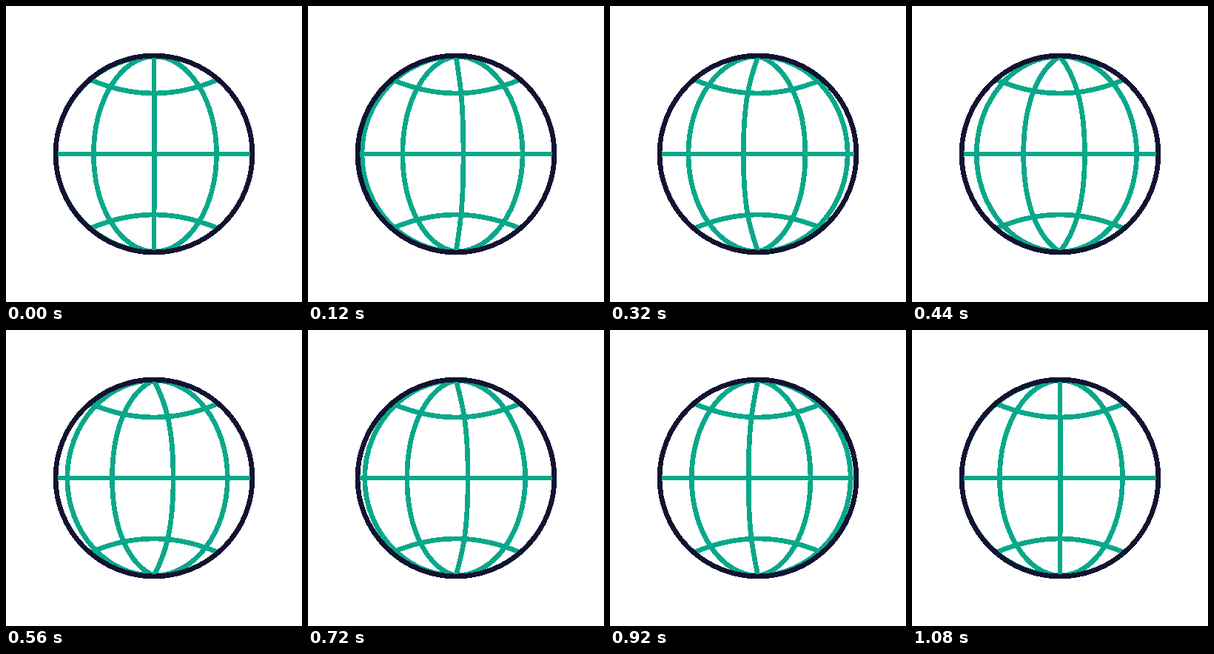
An HTML page for the animation above (3600 ms loop, 400 px wide and 400 px high).

```html
<!DOCTYPE html>
<html lang="en">
<head>
<meta charset="utf-8">
<title>Spinning globe</title>
<style>
  html, body { margin: 0; width: 100%; height: 100%; overflow: hidden; background: #fff; }
  svg { display: block; width: 100%; height: 100%; shape-rendering: crispEdges; }
</style>
</head>
<body>
<svg viewBox="0 0 400 400" fill="none" stroke-width="6.7">
  <g stroke="#08a88a">
    <path id="meridians"/>
    <path d="M68 200H332M115 100Q200 136 285 100M115 300Q200 264 285 300"/>
  </g>
  <circle cx="200" cy="200" r="133" stroke="#121331"/>
</svg>
<script>
  const LOOP = 3600, STEP = 40, SPIN_END = 1080, SPIN_MID = 520;
  const CENTER = 200, TOP = 68, BOTTOM = 332;
  // Equator crossings; each meridian travels from one stop to the next per turn.
  const STOPS = [67, 118.5, 200.3, 284.5, 333];
  const meridians = document.getElementById('meridians');

  // Four turns: accelerate for two, then slow down for two.
  function turns(t) {
    if (t >= SPIN_END) return 4;
    if (t < SPIN_MID) return 2 * (t / 531) ** 1.922;
    return 4 - 2 * ((SPIN_END - t) / 565) ** 2;
  }

  function meridian(x) {
    const bulge = x - CENTER;
    const poleX = CENTER + 0.55 * bulge;
    const pinch = 40 * Math.max(0, 1 - Math.abs(bulge) / 84);
    return `M${CENTER} ${TOP}C${poleX} ${TOP + pinch} ${x} 127 ${x} 200` +
           `C${x} 273 ${poleX} ${BOTTOM - pinch} ${CENTER} ${BOTTOM}`;
  }

  function draw(now) {
    const t = Math.floor((now % LOOP) / STEP) * STEP;
    const phase = turns(t) % 1;
    meridians.setAttribute('d', STOPS.slice(0, -1)
      .map((x, i) => meridian(x + (STOPS[i + 1] - x) * phase))
      .join(''));
  }

  const start = performance.now();
  function tick() {
    draw(performance.now() - start);
    requestAnimationFrame(tick);
  }
  tick();
</script>
</body>
</html>
```
